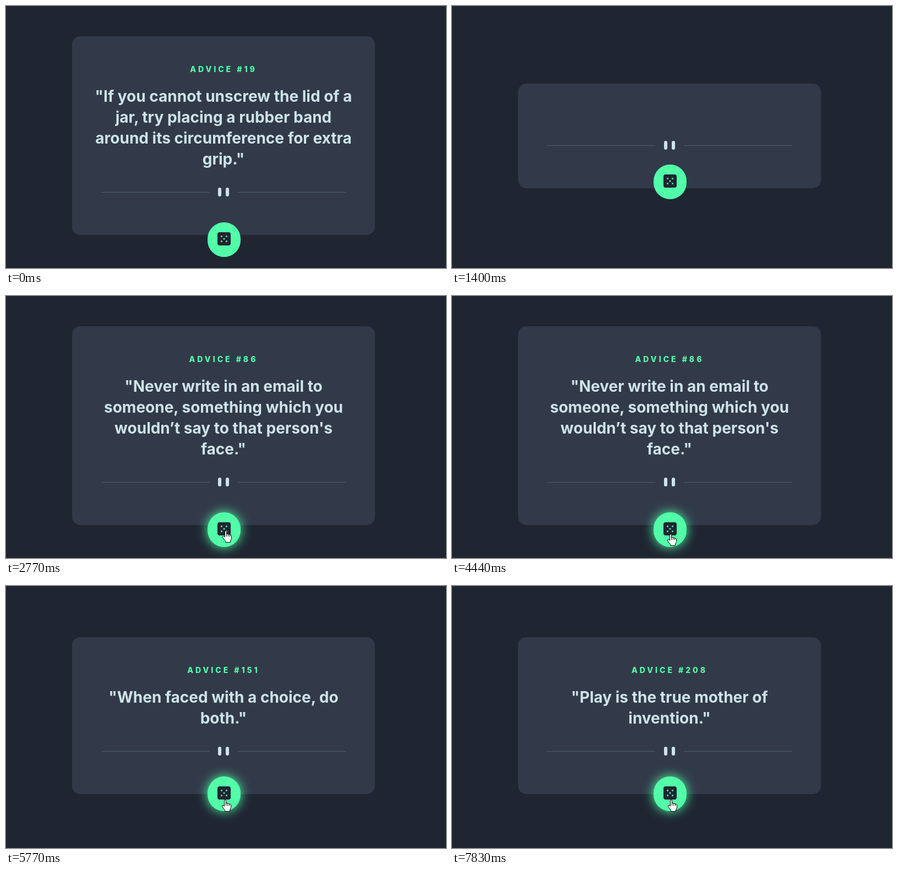
An HTML page for the animation above (8 s loop, 799 by 476 pixels).

```html
<!DOCTYPE html>
<html lang="en">
<head>
<meta charset="utf-8">
<style>
  html, body { margin: 0; width: 100%; height: 100%; overflow: hidden; background: #1f2632; }
  svg { display: block; }
  text { font-family: Inter, sans-serif; text-anchor: middle; white-space: pre; }
  #title { font-size: 14px; font-weight: 800; letter-spacing: 4px; fill: #52ffa8; }
  #quote { font-size: 28px; font-weight: 700; fill: #cee3e9; }
  #pad { width: 60px; height: 63px; border-radius: 30px; background: #52ffa8; position: absolute; left: 366px; }
  #pad.hover { box-shadow: 0 0 20px #52ffa8; }
  #overlay { position: absolute; left: 0; top: 0; }
</style>
</head>
<body>
<svg width="799" height="476">
  <rect id="card" x="120" width="550" rx="15" fill="#323a49"/>
  <text id="title" x="395"></text>
  <g id="quote"></g>
  <g id="divider">
    <path d="M0 8h196v1H0zM248 8h196v1H248z" fill="#4f5d74"/>
    <path d="M215 3v10M229 3v10" stroke="#cee3e9" stroke-width="6" stroke-linecap="round"/>
  </g>
</svg>
<div id="pad"></div>
<svg id="overlay" width="799" height="476">
  <g id="dice">
    <rect width="24" height="24" rx="4" fill="#1f2632"/>
    <path d="M7.5 7.5h0M16.5 7.5h0M12 12h0M7.5 16.5h0M16.5 16.5h0" stroke="#52ffa8" stroke-width="3" stroke-linecap="round"/>
  </g>
  <g id="cursor">
    <circle id="click" r="12" fill="#ff0" fill-opacity=".47"/>
    <path id="arrow" d="M.5 .5V16.5L4.2 13 6.7 18.5 9 17.5 6.6 12H11.5Z" fill="#fff" stroke="#000"/>
    <path id="hand" d="M-1.5 12V2Q-1.5.5 0 .5T1.5 2V7.5Q1.8 6 3 6T4.5 8Q5 6.7 6 6.8T7.5 9Q8 7.8 9 8T10.5 10V14.5L8.5 19V21.5H-.5V19.5L-4.5 14Q-6.3 11.6-5 10.7T-1.5 12ZM1.5 7.5V11M4.5 8V11M7.5 9V11.5"
      fill="#fff" stroke="#000"/>
  </g>
</svg>
<script>
const LOOP = 8000;
const el = id => document.getElementById(id);

const pages = [
  { at: 0, title: 'ADVICE #19', lines: ['"If you cannot unscrew the lid of a', 'jar, try placing a rubber band', 'around its circumference for extra', 'grip."'] },
  { at: 1400, title: '', lines: [] },
  { at: 1670, title: 'ADVICE #86', lines: ['"Never write in an email to', 'someone, something which you', 'wouldn’t say to that person\'s', 'face."'] },
  { at: 5100, title: 'ADVICE #151', lines: ['"When faced with a choice, do', 'both."'] },
  { at: 7830, title: 'ADVICE #208', lines: ['"Play is the true mother of', 'invention."'] }
];

// Pointer phases: hidden without "to"; otherwise glides in discrete steps.
const moves = [
  { at: 0 },
  { at: 200, to: [735, 375] },
  { at: 270 },
  { at: 1670, to: [676, 31] },
  { at: 1740 },
  { at: 2000, from: [715, 328], to: [399, 426], steps: 9 },
  { at: 4440, from: [399, 426], to: [394, 442], steps: 5 },
  { at: 5500, from: [394, 442], to: [398, 388], steps: 5 }
];
const clicks = [[2620, 2770], [4780, 4900], [6170, 6310], [7430, 7630]];

const STEP = 67.5;
const current = (list, t) => list.findLast(item => item.at <= t);
const show = (id, on) => el(id).setAttribute('visibility', on ? 'visible' : 'hidden');
const place = (id, x, y) => el(id).setAttribute('transform', `translate(${x} ${y})`);

function pointer(t) {
  const { at, from, to, steps } = current(moves, t);
  if (!from) return to;
  const p = Math.min(1, (Math.floor((t - at) / STEP) + 1) / steps);
  const eased = p * (2 - p);
  return from.map((v, i) => Math.round(v + (to[i] - v) * eased));
}

let shown, padTop;
function layout(page) {
  const { title, lines } = page;
  const height = lines.length ? 209 + 38 * lines.length : 190;
  const exactTop = (471 - height) / 2;
  const top = Math.round(exactTop);
  padTop = Math.round(exactTop + height * 1.11 - 63);
  el('card').setAttribute('y', top);
  el('card').setAttribute('height', height);
  el('title').setAttribute('y', top + 65);
  el('title').textContent = title;
  el('quote').innerHTML = lines.map((line, i) => `<text x="395" y="${top + 119 + 38 * i}">${line}</text>`).join('');
  place('divider', 173, top + height - 86);
  el('pad').style.top = padTop + 'px';
  place('dice', 384, padTop + 18);
  shown = page;
}

function draw(t) {
  const page = current(pages, t);
  if (page !== shown) layout(page);
  const pos = pointer(t);
  const hover = !!pos && Math.hypot(pos[0] - 396, pos[1] - padTop - 31.5) < 31;
  el('pad').className = hover ? 'hover' : '';
  show('arrow', pos && !hover);
  show('hand', hover);
  show('click', pos && clicks.some(([on, off]) => t >= on && t < off));
  if (pos) place('cursor', ...pos);
}

function frame() {
  draw(performance.now() % LOOP);
  requestAnimationFrame(frame);
}
frame();
</script>
</body>
</html>
```
